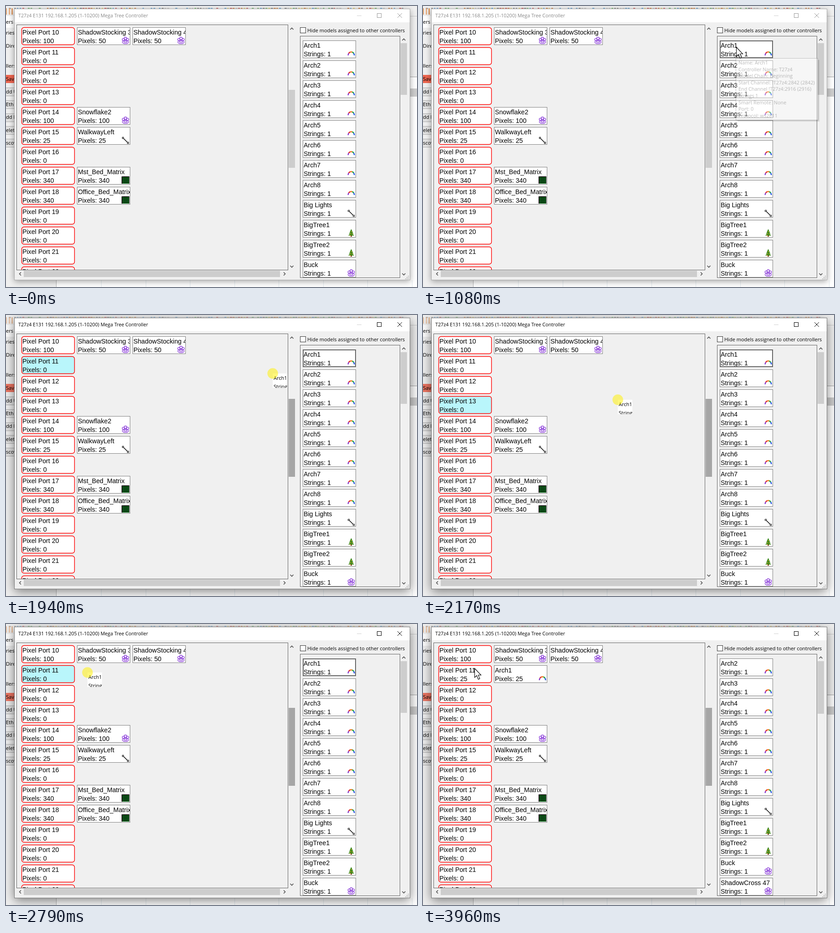
Write an HTML page with a canvas that moves like this. It is 903x620 px and loops after 5.12 s.

```html
<!DOCTYPE html>
<html lang="en">
<head>
<meta charset="utf-8">
<title>Port assignment</title>
<style>
  html, body { margin: 0; width: 100%; height: 100%; overflow: hidden; background: #fff; }
  canvas { display: block; }
</style>
</head>
<body>
<canvas id="stage" width="903" height="620"></canvas>
<script>
const ctx = document.getElementById('stage').getContext('2d');
const LOOP = 5120, ROW = 44, BOX_W = 116, BOX_H = 38;
const UI = '"Open Sans", "Noto Sans", sans-serif';
const LIST = '14.2px "Liberation Sans", Arial, sans-serif';

const portPixels = [100, 0, 0, 0, 100, 25, 0, 340, 340, 0, 0, 0, 0];
const assigned = [
  [0, 0, 'ShadowStocking 3', 50, 'custom'],
  [0, 1, 'ShadowStocking 4', 50, 'custom'],
  [4, 0, 'Snowflake2', 100, 'custom'],
  [5, 0, 'WalkwayLeft', 25, 'line'],
  [7, 0, 'Mst_Bed_Matrix', 340, 'matrix'],
  [8, 0, 'Office_Bed_Matrix', 340, 'matrix']
];
const available = [
  ...Array.from({ length: 8 }, (_, i) => ['Arch' + (i + 1), 'arch']),
  ['Big Lights', 'line'], ['BigTree1', 'tree'], ['BigTree2', 'tree'],
  ['Buck', 'custom'], ['ShadowCross 47', 'custom']
];
const tipLines = [
  'Name: Arch1', 'Controller Name: T27z4', 'Model Chain: Beginning',
  'Start Channel: !T27z4:2842 (2842)', 'End Channel !T27z4:2916 (2916)',
  'Strings 1', 'Smart Remote: None', 'Port: 0', 'Protocol: ws2811'
];

function rect(x, y, w, h, fill) {
  ctx.fillStyle = fill;
  ctx.fillRect(x, y, w, h);
}
function frame(x, y, w, h, color) {
  ctx.strokeStyle = color;
  ctx.lineWidth = 1;
  ctx.strokeRect(x + .5, y + .5, w, h);
}
function text(str, x, y, color = '#000', font = '11px ' + UI) {
  ctx.font = font;
  ctx.fillStyle = color;
  ctx.fillText(str, x, y);
}
function path(points, color, width = 1) {
  ctx.beginPath();
  points.forEach(([x, y]) => ctx.lineTo(x, y));
  ctx.strokeStyle = color;
  ctx.lineWidth = width;
  ctx.stroke();
}
function clipped(x, y, w, h, draw) {
  ctx.save();
  ctx.beginPath();
  ctx.rect(x, y, w, h);
  ctx.clip();
  draw();
  ctx.restore();
}

// 16 x 16 icons, drawn from their top left corner
const icons = {
  arch() {
    const colors = ['#8a3fd0', '#e03030', '#f08020', '#20a040', '#2858e0'];
    const step = Math.PI / colors.length;
    ctx.lineWidth = 2.6;
    colors.forEach((color, i) => {
      ctx.beginPath();
      ctx.ellipse(8.5, 12, 6.8, 7.6, 0, Math.PI + i * step, Math.PI + (i + 1) * step);
      ctx.strokeStyle = color;
      ctx.stroke();
    });
  },
  line() {
    path([[3, 3], [14, 14]], '#000', 1.4);
    for (const p of [1, 12]) {
      rect(p, p, 4, 4, '#fff');
      frame(p, p, 3, 3, '#000');
    }
  },
  matrix() {
    rect(0, 0, 17, 16, '#000');
    for (let i = 0; i < 25; i++) rect(2 + i % 5 * 3, 2 + (i / 5 | 0) * 3, 2, 1.5, '#20d840');
  },
  tree() {
    rect(7, 13, 3, 3, '#8a4b20');
    ctx.fillStyle = '#3a8a1c';
    for (const [y, w] of [[0, 3.2], [3.5, 5], [7.5, 6.5]]) {
      ctx.beginPath();
      ctx.moveTo(8.5, y - 1);
      ctx.lineTo(8.5 + w, y + 6);
      ctx.lineTo(8.5 - w, y + 6);
      ctx.fill();
    }
    for (const [x, y] of [[8, 4], [6, 8], [10, 9], [5, 12]]) rect(x, y, 2, 1.5, '#e8a030');
  },
  custom() {
    ctx.strokeStyle = '#7a22d4';
    ctx.lineWidth = 1.1;
    for (const [x, y, rx, ry] of [[8.5, 3.5, 3, 2.6], [3.8, 6, 2.5, 2.5], [13.2, 6, 2.5, 2.5], [8.5, 11.5, 7, 3.8], [8.5, 11, 3.6, 1.8]]) {
      ctx.beginPath();
      ctx.ellipse(x, y, rx, ry, 0, 0, 7);
      ctx.stroke();
    }
  }
};

function labels(x, y, top, bottom) {
  text(top, x + 2, y + 16, '#000', LIST);
  text(bottom, x + 2, y + 35, '#000', LIST);
}
function modelBox(x, y, name, detail, icon, hot) {
  rect(x, y, BOX_W + 1, BOX_H + 1, '#fff');
  clipped(x, y, BOX_W, BOX_H, () => labels(x, y, name, detail));
  ctx.save();
  ctx.translate(x + 98, y + 21);
  icons[icon]();
  ctx.restore();
  frame(x, y, BOX_W, BOX_H, hot ? '#666' : '#808080');
  if (hot) frame(x + 1, y + 1, BOX_W - 2, BOX_H - 2, '#666');
}
function portBox(row, pixels, hot) {
  const y = 47 + row * ROW;
  ctx.beginPath();
  ctx.roundRect(34.5, y + .5, BOX_W, BOX_H, 5);
  ctx.fillStyle = hot ? '#b9f6fb' : '#fff';
  ctx.fill();
  ctx.strokeStyle = '#f00';
  ctx.lineWidth = 1.4;
  ctx.stroke();
  labels(34, y, 'Pixel Port ' + (10 + row), 'Pixels: ' + pixels);
}
function chevron(x, y, angle) {
  ctx.save();
  ctx.translate(x, y);
  ctx.rotate(angle);
  path([[-3.5, 2], [0, -1.5], [3.5, 2]], '#505050', 1.6);
  ctx.restore();
}

function background(active) {
  rect(0, 0, 903, 620, '#fff');
  rect(0, 0, 903, 22, '#f0f0f0');
  const colors = ['#d98a4a', '#6fa8d8', '#7fbf7a', '#c9c9c9', '#d66a6a', '#8a8a8a', '#e6d37a'];
  ctx.globalAlpha = active ? .5 : .85;
  for (let i = 0; i < 148; i++) {
    const n = Math.abs(Math.sin(i * 12.9898) * 43758.5453) % 1;
    if (n > .2) rect(i * 6, 4, 2 + n * 3, 3, colors[n * 97 % 7 | 0]);
  }
  rect(0, 5, 2, 14, '#e09a60');
  rect(6, 5, 3, 14, '#e8a878');
  rect(12, 5, 3, 14, '#d98a4a');
  ctx.globalAlpha = 1;
  rect(0, 48, 111, 572, '#f0f0f0');
  rect(110, 605, 1, 15, '#b4b4b4');
  for (let x = 209; x < 903; x += 97.5) rect(Math.round(x), 605, 1, 15, '#e2eaee');
  rect(888, 22, 15, 134, '#f0f0f0');
  rect(888, 22, 15, 1, '#c8c8c8');
  rect(888, 156, 15, 1, '#a0a0a0');
  rect(888, 182, 15, 18, '#cdcdcd');
  rect(0, 152, 19, 18, active ? '#ee7663' : '#ee6650');
  for (let i = 0; i < 5; i++) {
    rect(0, Math.round(180 + i * 28.3), 19, 19, '#e1e1e1');
    frame(-2, Math.round(180 + i * 28.3), 24, 18, '#adadad');
  }
  [['ers', 39], ['ries', 63], ['Dire', 92], ['llers', 136], ['Save', 165], ['dd U', 193],
   ['Eth', 221], ['dd N', 249], ['elete', 278], ['scov', 306]].forEach(([s, y]) => text(s, 0, y));
}

function dialog(active) {
  ctx.save();
  ctx.shadowColor = active ? 'rgba(0,0,0,.5)' : 'rgba(0,0,0,.36)';
  ctx.shadowBlur = active ? 22 : 13;
  ctx.shadowOffsetY = active ? 5 : 3;
  rect(18, 7, 870, 598, '#f0f0f0');
  ctx.restore();
  rect(18, 7, 870, 29, '#fff');
  frame(18, 6, 869, 598, active ? '#777' : '#aaa');

  const ink = active ? '#000' : '#999';
  text('T27z4 E131 192.168.1.205 (1-10200) Mega Tree Controller', 27, 25, active ? '#000' : '#888', '10.7px ' + UI);
  path([[771, 21.5], [781, 21.5]], '#d0d0d0');
  frame(815, 16, 9, 9, ink);
  path([[860, 16], [870, 26]], ink);
  path([[870, 16], [860, 26]], ink);

  rect(647, 48, 11, 11, '#fff');
  frame(646, 47, 12, 12, '#333');
  text('Hide models assigned to other controllers', 662, 58);
  for (let i = 0; i < 6; i++) {
    const column = [0, 1, 1, 2, 2, 2][i], row = [2, 1, 2, 0, 1, 2][i];
    rect(877 + column * 3, 595 + row * 3, 2, 2, '#bdbdbd');
  }
}

function scrollbars(dark, moved) {
  rect(621, 185, 14, 172, dark ? '#a6a6a6' : '#cdcdcd');
  rect(39, 584, 563, 14, '#cdcdcd');
  rect(867, 82, 14, moved ? 116 : 114, '#cdcdcd');
  chevron(628, 50, 0);
  chevron(628, 575, Math.PI);
  chevron(31, 591, -Math.PI / 2);
  chevron(612, 591, Math.PI / 2);
  chevron(874, 74, 0);
  chevron(874, 592, Math.PI);
}

function tooltip(alpha) {
  ctx.save();
  ctx.globalAlpha = alpha;
  for (const size of [1, 3]) {
    rect(868, 119, size, 133 + size, 'rgba(0,0,0,.28)');
    rect(691, 252, 177, size, 'rgba(0,0,0,.28)');
  }
  rect(688, 116, 179, 135, '#fff');
  frame(687, 115, 180, 136, '#767676');
  tipLines.forEach((line, i) => text(line, 693, 129 + i * 14.6, '#4c4c4c', '10.8px ' + UI));
  ctx.restore();
}

function pointer(x, y) {
  ctx.save();
  ctx.translate(x, y);
  ctx.beginPath();
  [[.5, 0], [.5, 20], [5, 15.8], [8.4, 24], [11.8, 22.6], [8.4, 14.8], [14.5, 14.8]].forEach(([a, b]) => ctx.lineTo(a, b));
  ctx.closePath();
  ctx.fillStyle = '#fff';
  ctx.fill();
  ctx.strokeStyle = '#000';
  ctx.lineWidth = 1.1;
  ctx.stroke();
  ctx.restore();
}
function clickSpot(x, y, alpha) {
  ctx.beginPath();
  ctx.arc(x, y, 11.7, 0, 7);
  ctx.fillStyle = `rgba(255,240,0,${alpha})`;
  ctx.fill();
}
function dragImage(x, y) {
  clipped(x, y, 32, 32, () => {
    rect(x, y, 32, 32, '#fff');
    text('Arch1', x + 2, y + 14);
    text('Strings: 1', x + 2, y + 33);
  });
  clickSpot(x, y, .52);
}

const mix = (a, b, p) => a + (b - a) * p;
const easeOut = (p, power) => 1 - (1 - p) ** power;
// Progress in held steps, as a screen recorder samples the mouse
const stepped = (t, start, gap, count, first) =>
  Math.max(0, Math.min(1, (Math.floor((t - start) / gap + .05) + first) / count));

function mouseAt(t) {
  if (t < 1720) {
    const p = easeOut(stepped(t, 450, 78.3, 6, 0), 1.8);
    return [mix(893, 688, p), mix(123, 92, p)];
  }
  if (t < 2480) {
    const p = stepped(t, 1720, 75, 7, 1), s = p * p * (3 - 2 * p);
    return [mix(688, 428, s), mix(92, 187, s)];
  }
  const p = stepped(t, 2480, 76.7, 8, 1);
  return [mix(428, 113, easeOut(p, 1.6)), mix(187, 99, easeOut(p, 2.45))];
}

function draw(t) {
  const [x, y] = mouseAt(t);
  const active = t >= 1550, dragging = t >= 1720 && t < 3570;
  const dropped = t >= 3890, removed = t >= 3960;
  const overPorts = t >= 1720 && x < 620 && !dropped;
  const hotRow = overPorts ? Math.floor((y - 47) / ROW) : -1;

  background(active);
  dialog(active);
  scrollbars(t >= 1720 && x < 636, removed);

  clipped(24, 42, 595, 540, () => {
    portPixels.forEach((n, row) => portBox(row, dropped && row === 1 ? 25 : n, row === hotRow));
    const models = dropped ? [...assigned, [1, 0, 'Arch1', 25, 'arch']] : assigned;
    models.forEach(([row, col, name, n, icon]) =>
      modelBox(156 + col * 122, 47 + row * ROW, name, 'Pixels: ' + n, icon));
  });
  frame(23, 41, 596, 541, '#646464');

  const hovered = t >= 450 && x < 769 && !removed;
  clipped(647, 67, 219, 532, () => available.slice(removed ? 1 : 0).forEach(([name, icon], i) =>
    modelBox(652, 76 + i * ROW, name, 'Strings: 1', icon, hovered && i === 0)));
  frame(646, 66, 219, 533, '#646464');

  if (t >= 1080 && t < 1720) tooltip(t < 1150 ? .38 : t < 1230 ? .72 : 1);
  if (t >= 1550 && t < 1720) clickSpot(x, y, .8);
  if (dragging) dragImage(Math.round(x), Math.round(y));
  else if (t >= 450) pointer(x, y - 1);
}

const started = performance.now();
function tick() {
  draw((performance.now() - started) % LOOP);
  requestAnimationFrame(tick);
}
tick();
</script>
</body>
</html>
```
